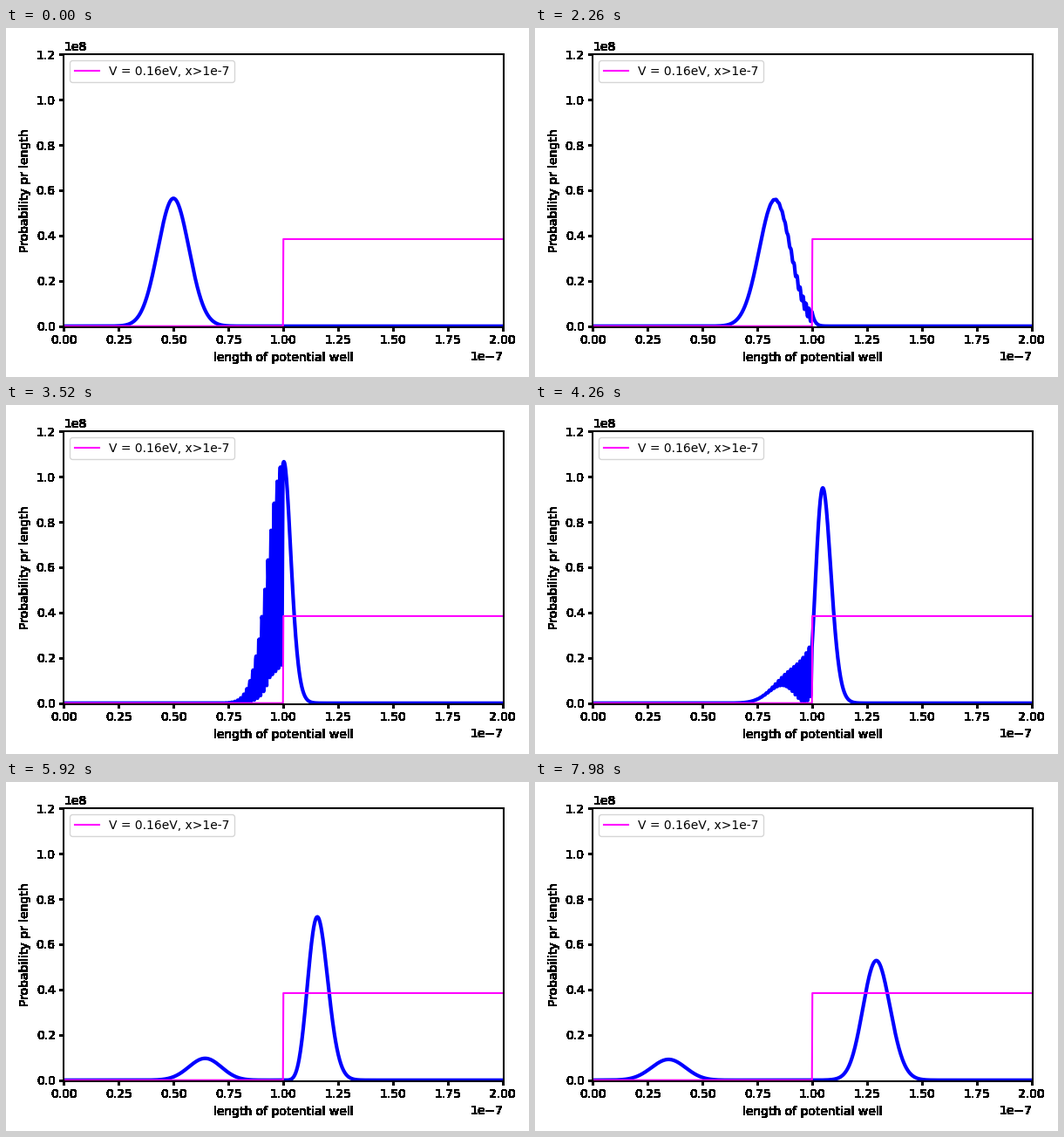
Write a matplotlib script that moves like this. It is 600 px wide and 400 px high and loops after 8 s.

```python
import numpy as np
import matplotlib.pyplot as plt
from matplotlib.animation import FuncAnimation
from matplotlib.patches import Rectangle

FRAMES, INTERVAL = 400, 20

# Physical constants (SI)
HBAR, MASS, EV = 1.0546e-34, 9.109e-31, 1.602e-19

# Packet, barrier and grid
LENGTH, POINTS = 2e-7, 1000
START, WIDTH, ENERGY = 5e-8, 1e-8, 0.2 * EV
STEP_AT, STEP = 1e-7, 0.16 * EV
DT = 1.142e-15
V_SCALE = 1.5e27


def evolve(x, pot):
    """Probability density of the packet for every frame, one column each."""
    dx = x[1] - x[0]
    hop = HBAR**2 / (2 * MASS * dx**2)
    ham = np.diag(2 * hop + pot)
    ham -= hop * (np.eye(len(x), k=1) + np.eye(len(x), k=-1))
    energy, modes = np.linalg.eigh(ham)

    k = np.sqrt(2 * MASS * ENERGY) / HBAR
    psi = np.exp(-((x - START) ** 2) / (2 * WIDTH**2) + 1j * k * x)
    psi /= np.sqrt(np.sum(np.abs(psi) ** 2) * dx)

    times = DT * np.arange(FRAMES)
    phases = np.exp(-1j * np.outer(energy, times) / HBAR)
    return np.abs(modes @ ((modes.T @ psi)[:, None] * phases)) ** 2


def harden(img, dpi):
    """Turn every touched pixel solid black."""
    out = np.zeros_like(img)
    out[..., 3] = img[..., 3] > 0
    return out, 0, 0


x = np.linspace(0, LENGTH, POINTS)
pot = np.where(x > STEP_AT, STEP, 0)
density = evolve(x, pot)

fig, ax = plt.subplots(figsize=(6, 4), dpi=100)
wave, = ax.plot(x, density[:, 0], color="blue", lw=3)
ax.plot(x, pot * V_SCALE, color="magenta", label="V = 0.16eV, x>1e-7")
ax.set(xlim=(0, LENGTH), ylim=(0, 1.2e8),
       xlabel="length of potential well", ylabel="Probability pr length")
ax.legend(loc="upper left")
fig.tight_layout()

# Hard-edged labels and ticks, and a frame one pixel wider on the outside
for axis in (ax.xaxis, ax.yaxis):
    axis.set_agg_filter(harden)
left, bottom, right, top = np.round(ax.bbox.extents)
fig.add_artist(Rectangle((left - 1, bottom - 2), right - left + 3,
                         top - bottom + 3, transform=None, fc="black",
                         lw=0, zorder=-1))


def update(i):
    wave.set_ydata(density[:, i])
    return wave,


anim = FuncAnimation(fig, update, frames=FRAMES, interval=INTERVAL,
                     repeat=True, repeat_delay=0)
plt.show()
```
